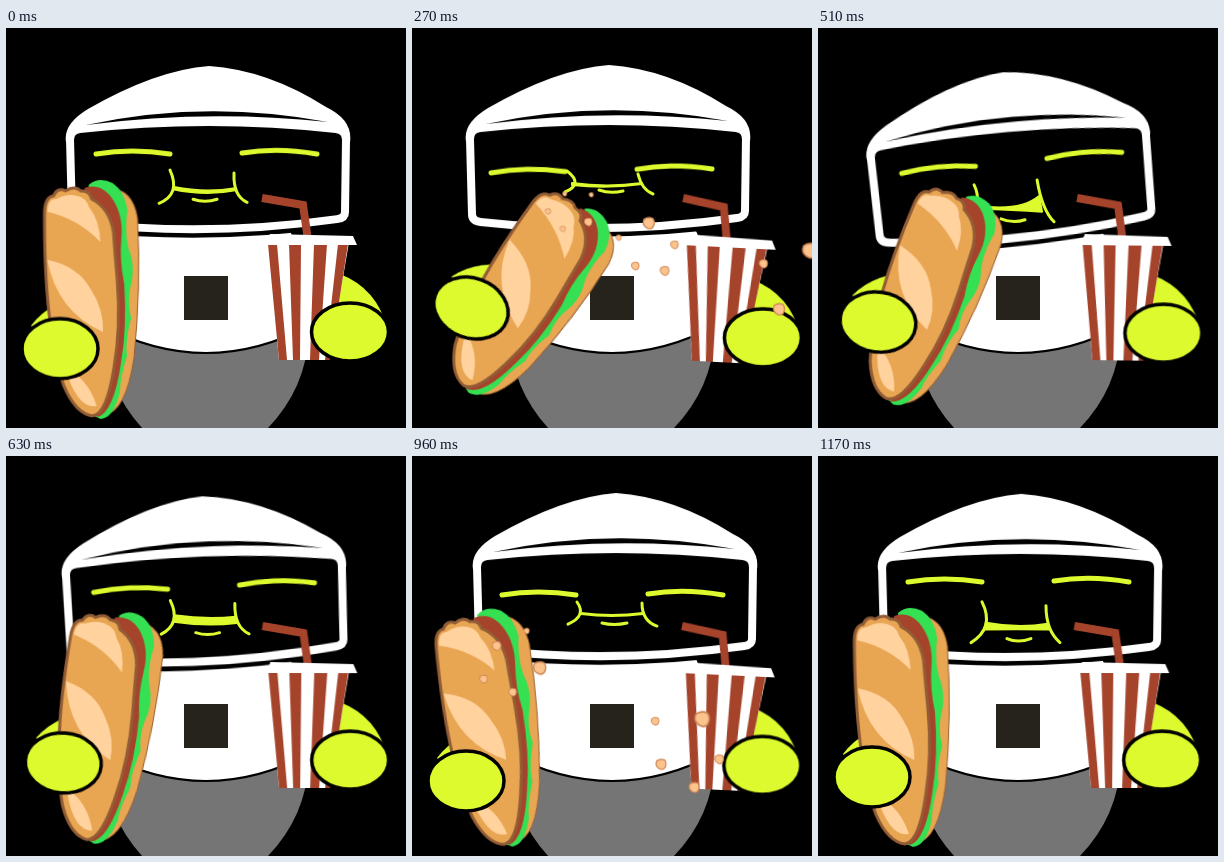
Animation of 400 by 400 pixels, one loop 1200 ms. Source, as an HTML page without scripts:

```html
<!DOCTYPE html>
<html lang="en">
<head>
<meta charset="utf-8">
<title>Lunch break</title>
<style>
html, body { margin: 0; width: 100%; height: 100%; overflow: hidden; background: #000; }
svg { display: block; width: 100vw; height: 100vh; }

.head, .visor, .brows, .mouth, .lines, .arm, .sandwich, .crumb {
  animation: 1.2s linear infinite;
}
.lime { fill: #dcfa2d; }
.stroke { fill: none; stroke: #dcfa2d; stroke-linecap: round; }
.hand { fill: #dcfa2d; stroke: #000; stroke-width: 3.5; }
.bun { fill: #e8a552; }
.shine { fill: #ffd29e; }
.brown { fill: #a5432b; }

.head { animation-name: head; transform-origin: 202px 120px; }
@keyframes head {
  0%, 100% { transform: none; }
  12.5% { transform: translate(3px, 0) rotate(.8deg); }
  22.5% { transform: translate(-6px, -1px); }
  42.5% { transform: translate(-11px, 6px) rotate(-5deg); }
  50% { transform: translate(-5px, 3px) rotate(-2.5deg); }
  65% { transform: translate(2px, -1px); }
  80% { transform: translate(1px, -1px); }
}

.visor { animation-name: visor; transform-origin: 202px 95px; }
@keyframes visor {
  0%, 22.5%, 32.5%, 50%, 72.5%, 80%, 97.5%, 100% { transform: none; }
  12.5% { transform: scaleY(1.17); }
  42.5% { transform: scaleY(1.03); }
  65% { transform: scaleY(1.11); }
}

.brows { animation-name: brows; transform-origin: 200px 124px; }
@keyframes brows {
  0%, 97.5%, 100% { transform: none; }
  12.5% { transform: translate(-1px, 11px) rotate(1.5deg); }
  22.5% { transform: translate(-11px, 17px) rotate(-1deg); }
  42.5% { transform: translate(-7px, 9px) rotate(-5.5deg); }
  50% { transform: translate(-3px, 5px) rotate(-3deg); }
  65% { transform: translate(0, 9px); }
  80% { transform: translate(0, 13px); }
}

.mouth { animation-name: mouth; }
@keyframes mouth {
  0%, 50%, 100% { d: path("M168 159Q200 165 229 160L229 162Q200 168 167 161Z"); }
  12.5% { d: path("M172 174Q210 204 234 187L242 205Q210 198 170 200Z"); }
  22.5%, 32.5% { d: path("M160 155Q195 160 230 155L230 156Q195 161 160 157Z"); }
  42.5% { d: path("M160 178Q202 184 221 168L224 184Q195 182 160 181Z"); }
  65% { d: path("M169 161Q203 157 234 164L239 191Q203 184 170 189Z"); }
  72.5%, 80% { d: path("M169 157Q200 161 231 157L231 158Q200 162 169 158Z"); }
  97.5% { d: path("M168 167Q200 173 230 168L231 174Q200 173 166 174Z"); }
}

.lines { animation-name: lines; }
@keyframes lines {
  0%, 50%, 100% { d: path("M164 142Q175 166 153 175M228 145Q227 168 241 174M187 171Q199 175 211 171"); }
  12.5% { d: path("M166 154Q177 190 160 215M232 162Q236 195 253 217M200 212Q212 216 223 212"); }
  22.5%, 32.5% { d: path("M155 143Q172 156 153 164M226 146Q230 162 241 166M187 162Q198 166 211 163"); }
  42.5% { d: path("M156 157Q165 175 150 195M219 152Q224 182 236 194M183 191Q195 196 207 192"); }
  65% { d: path("M166 157Q178 176 166 193M233 160Q234 186 253 196M203 204Q214 207 226 204"); }
  72.5%, 80% { d: path("M165 146Q175 160 156 168M230 147Q230 165 245 170M190 167Q202 170 215 167"); }
  97.5% { d: path("M164 146Q177 172 153 187M228 150Q228 175 242 187M189 183Q200 188 213 183"); }
}

.sandwich { animation-name: sandwich; transform-origin: 86px 270px; }
@keyframes sandwich {
  0%, 100% { transform: none; }
  12.5% { transform: translate(26px, -8px) rotate(36deg) scale(1.05, .93); }
  22.5% { transform: translate(29px, -2px) rotate(36deg) scale(1.05, .93); }
  32.5% { transform: translate(28px, -2px) rotate(31deg) scale(1.04, .93); }
  42.5% { transform: translate(25px, -2px) rotate(23deg) scale(1.03, .94); }
  50% { transform: translate(17px, -1px) rotate(13deg) scale(1.02, .97); }
  57.5% { transform: translate(5px, 0) rotate(3deg); }
  65% { transform: translate(-6px, 0) rotate(-4deg); }
  80% { transform: translate(-6px, 1px) rotate(-5.5deg); }
  97.5% { transform: translate(-1px, 0) rotate(-.5deg); }
}

.arm { animation-name: arm; transform-origin: 54px 321px; }
@keyframes arm {
  0%, 97.5%, 100% { transform: none; }
  12.5% { transform: translate(2px, -43px) rotate(20deg); }
  22.5% { transform: translate(5px, -41px) rotate(20deg); }
  42.5% { transform: translate(6px, -27px) rotate(8deg); }
  65% { transform: translate(0, 2px); }
  80% { transform: translate(0, 4px); }
}

/* the drink rocks twice per loop */
.cup, .grip { animation: .3s cubic-bezier(.37, 0, .63, 1) infinite alternate; }
.cup { animation-name: cup; transform-origin: 298px 332px; }
@keyframes cup { to { transform: translate(7px, 2px) rotate(3deg); } }
.grip { animation-name: grip; }
@keyframes grip { to { transform: translate(7px, 6px); } }

.crumb {
  opacity: 0; fill: #fcc38c; stroke: #c98050; stroke-width: 1.2;
  animation-name: fly; animation-delay: var(--at);
}
@keyframes fly {
  0% { opacity: 1; transform: translate(calc(var(--x) - var(--u)), calc(var(--y) - var(--v))) scale(var(--s)); }
  20% { opacity: 1; transform: translate(calc(var(--x) + var(--u)), calc(var(--y) + var(--v))) scale(var(--s)); }
  20.01%, 100% { opacity: 0; }
}
.spill { --at: 90ms; }
.bite { --at: 155ms; }
.burst { --at: 660ms; }
.fall { --at: 840ms; }
</style>
</head>
<body>
<svg viewBox="0 0 400 400">
  <defs>
    <path id="crumb" d="M-5 -4Q-1 -7 4 -5Q7 -1 4 4Q1 7 -3 4Q-7 1 -5 -4Z"/>
    <path id="frame" d="M64 112Q64 102 74 101Q203 87 330 101Q340 102 340 112L339 184Q339 190 331 191Q203 209 75 195Q66 194 66 187Z"/>
  </defs>
  <rect width="400" height="400"/>

  <path d="M97 305Q100 362 138 402H260Q300 362 303 305Z" fill="#757575"/>
  <path d="M118 198H282Q305 250 305 297Q200 353 95 297Q95 250 118 198Z" fill="#fff"/>
  <path d="M95 297Q200 353 305 297" fill="none" stroke="#000" stroke-width="2"/>
  <rect x="178" y="248" width="44" height="44" fill="#26231c"/>

  <g class="head">
    <use href="#frame" class="visor" stroke="#000" stroke-width="17"/>
    <path d="M60 114Q57 96 82 81Q150 42 203 38Q262 42 320 79Q347 92 344 114Z" fill="#fff"/>
    <use href="#frame" class="visor" stroke="#fff" stroke-width="8"/>
    <path d="M80 97Q200 71 322 94Q200 81 80 97Z"/>
  </g>

  <g class="brows stroke" stroke-width="5">
    <path d="M90 126Q126 120 164 126"/>
    <path d="M236 125Q272 119 311 126"/>
  </g>
  <path class="mouth lime" stroke="#dcfa2d" stroke-width="2" stroke-linejoin="round" d="M168 159Q200 165 229 160L229 162Q200 168 167 161Z"/>
  <path class="lines stroke" stroke-width="3" d="M164 142Q175 166 153 175M228 145Q227 168 241 174M187 171Q199 175 211 171"/>

  <path class="arm lime" d="M88 266Q45 271 25 298L54 335L90 322Z"/>
  <g class="sandwich">
    <path class="bun" d="M98 160Q126 158 131 190Q135 260 128 330Q120 385 98 387Z" stroke="#9a6236"/>
    <path d="M82 157Q92 148 106 155Q118 163 121 182Q118 203 122 220Q130 240 124 260Q121 275 125 290Q119 312 121 328Q114 350 114 364Q108 390 95 391L84 386Z" fill="#35e052"/>
    <path class="brown" d="M78 160Q92 155 103 167Q117 184 115 210Q113 232 118 256Q121 300 115 335Q108 384 92 389L80 380Z"/>
    <path class="bun" d="M38 186Q38 169 47 168Q51 159 59 163Q68 157 74 163Q83 162 85 171Q103 180 107 204Q109 230 111 252Q115 300 108 340Q101 386 87 388Q70 386 58 358Q38 300 38 186Z" stroke="#925d36" stroke-width="3"/>
    <path class="shine" d="M41 184Q41 171 50 171Q61 165 71 168Q80 170 83 180Q93 192 94 214Q72 191 41 184Z"/>
    <path class="shine" d="M41 232Q72 238 85 262Q98 282 97 304Q51 284 41 232Z"/>
    <path class="shine" d="M59 340Q82 350 91 378Q72 382 59 340Z"/>
  </g>
  <ellipse class="arm hand" cx="54" cy="321" rx="38" ry="30"/>

  <path class="grip lime" d="M325 243Q364 254 378 290L345 325Z"/>
  <g class="cup">
    <path d="M256 170L297 177L302 212" fill="none" stroke="#a5432b" stroke-width="8"/>
    <path d="M261 214H343L323 332H273Z" fill="#fff"/>
    <path class="brown" d="M262 216H271L281 332H273ZM283 216H295L294 332H287ZM308 216H321L313 332H304ZM332 216H342L324 332H319Z"/>
    <path d="M264 206L347 208L351 217L252 217L262 213Z" fill="#fff"/>
  </g>
  <ellipse class="grip hand" cx="344" cy="304" rx="38.5" ry="29"/>

  <g>
    <use href="#crumb" class="crumb spill" style="--x:360px;--y:197px;--u:75px;--v:51px;--s:1.3"/>
    <use href="#crumb" class="crumb spill" style="--x:354px;--y:210px;--u:-5px;--v:51px;--s:.75"/>
    <use href="#crumb" class="crumb spill" style="--x:361px;--y:249px;--u:12px;--v:64px;--s:1"/>
    <use href="#crumb" class="crumb spill" style="--x:293px;--y:220px;--u:-60px;--v:-6px;--s:.7"/>

    <use href="#crumb" class="crumb bite" style="--x:238px;--y:196px;--u:35px;--v:20px;--s:1"/>
    <use href="#crumb" class="crumb bite" style="--x:254px;--y:245px;--u:40px;--v:60px;--s:.8"/>
    <use href="#crumb" class="crumb bite" style="--x:224px;--y:240px;--u:20px;--v:55px;--s:.7"/>
    <use href="#crumb" class="crumb bite" style="--x:207px;--y:211px;--u:10px;--v:35px;--s:.5"/>
    <use href="#crumb" class="crumb bite" style="--x:176px;--y:195px;--u:-8px;--v:25px;--s:.7"/>
    <use href="#crumb" class="crumb bite" style="--x:135px;--y:184px;--u:-30px;--v:15px;--s:.5"/>
    <use href="#crumb" class="crumb bite" style="--x:150px;--y:202px;--u:-22px;--v:30px;--s:.5"/>
    <use href="#crumb" class="crumb bite" style="--x:152px;--y:166px;--u:-20px;--v:2px;--s:.4"/>
    <use href="#crumb" class="crumb bite" style="--x:179px;--y:167px;--u:-5px;--v:4px;--s:.4"/>

    <use href="#crumb" class="crumb burst" style="--x:349px;--y:182px;--u:30px;--v:14px;--s:1.2"/>
    <use href="#crumb" class="crumb burst" style="--x:383px;--y:204px;--u:40px;--v:35px;--s:.9"/>
    <use href="#crumb" class="crumb burst" style="--x:340px;--y:238px;--u:8px;--v:50px;--s:.8"/>
    <use href="#crumb" class="crumb burst" style="--x:378px;--y:239px;--u:28px;--v:50px;--s:.9"/>
    <use href="#crumb" class="crumb burst" style="--x:206px;--y:180px;--u:4px;--v:10px;--s:.8"/>
    <use href="#crumb" class="crumb burst" style="--x:228px;--y:191px;--u:14px;--v:15px;--s:.6"/>
    <use href="#crumb" class="crumb burst" style="--x:186px;--y:197px;--u:-15px;--v:18px;--s:.4"/>
    <use href="#crumb" class="crumb burst" style="--x:205px;--y:215px;--u:2px;--v:30px;--s:.5"/>
    <use href="#crumb" class="crumb burst" style="--x:228px;--y:213px;--u:12px;--v:30px;--s:.6"/>

    <use href="#crumb" class="crumb fall" style="--x:128px;--y:212px;--u:-35px;--v:25px;--s:1.1"/>
    <use href="#crumb" class="crumb fall" style="--x:115px;--y:175px;--u:-40px;--v:8px;--s:.5"/>
    <use href="#crumb" class="crumb fall" style="--x:85px;--y:190px;--u:-45px;--v:15px;--s:.8"/>
    <use href="#crumb" class="crumb fall" style="--x:72px;--y:223px;--u:-45px;--v:35px;--s:.7"/>
    <use href="#crumb" class="crumb fall" style="--x:101px;--y:236px;--u:-35px;--v:40px;--s:.7"/>
    <use href="#crumb" class="crumb fall" style="--x:243px;--y:265px;--u:14px;--v:45px;--s:.7"/>
    <use href="#crumb" class="crumb fall" style="--x:249px;--y:308px;--u:16px;--v:60px;--s:.9"/>
    <use href="#crumb" class="crumb fall" style="--x:290px;--y:263px;--u:30px;--v:45px;--s:1.3"/>
    <use href="#crumb" class="crumb fall" style="--x:307px;--y:303px;--u:30px;--v:60px;--s:.8"/>
    <use href="#crumb" class="crumb fall" style="--x:282px;--y:331px;--u:20px;--v:65px;--s:.9"/>
  </g>
</svg>
</body>
</html>
```
